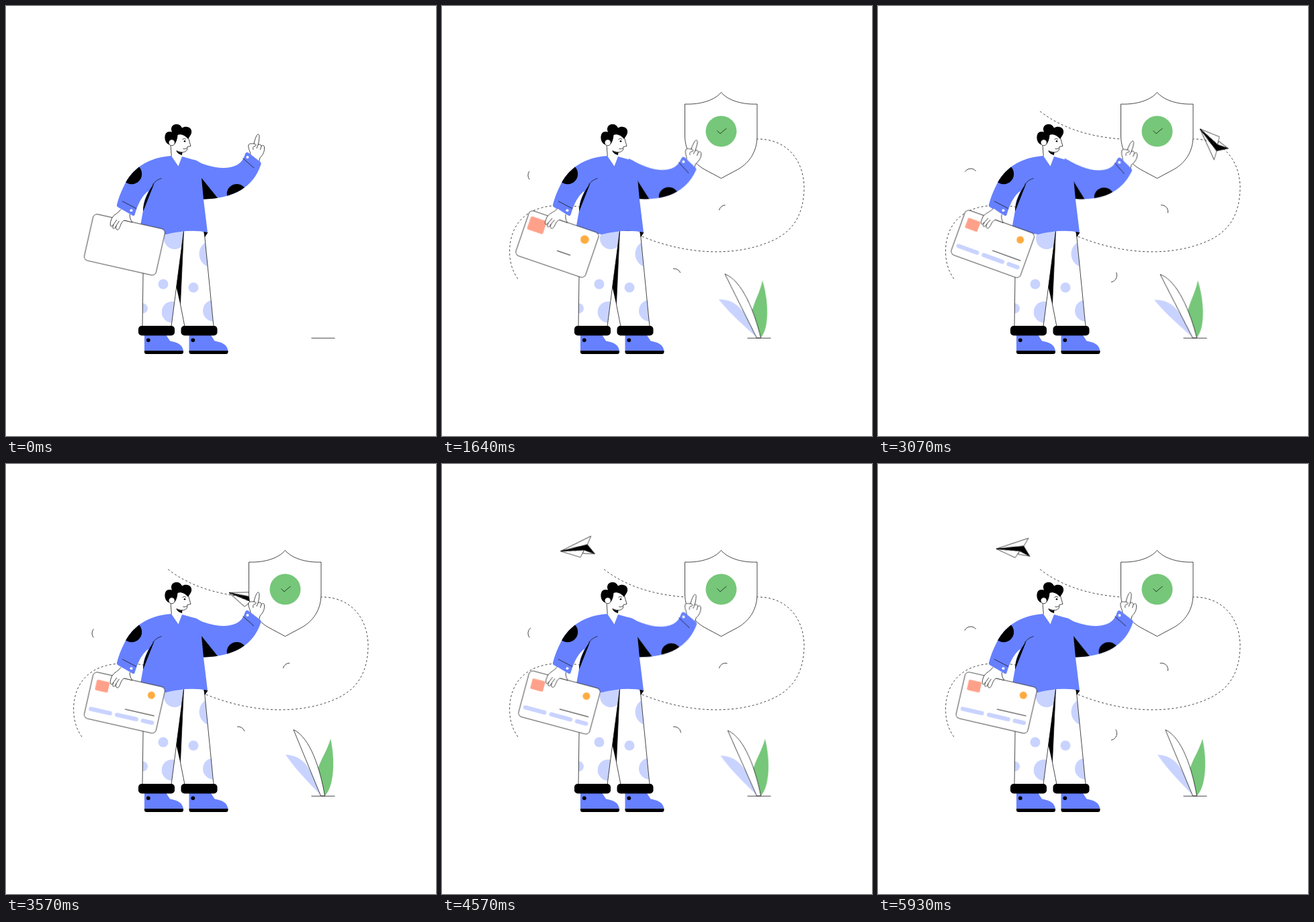
Recreate the animation shown at these times as an HTML page without scripts. Size 640 px wide and 640 px high, loop 6 s.

```html
<!DOCTYPE html>
<html lang="en">
<head>
<meta charset="utf-8">
<title>Secure payment</title>
<style>
html, body { margin: 0; width: 100%; height: 100%; overflow: hidden; background: #fff; }
svg { display: block; width: 100vw; height: 100vh; }
.ink { stroke: #1a1a1a; stroke-width: .8; stroke-linejoin: round; }
.line { fill: none; }
.white { fill: #fff; }
.blue { fill: #6680ff; }
.pale { fill: #c9d3ff; }
.green { fill: #76c779; }

/* swaying limbs and leaves */
.sway { animation: sway .6s cubic-bezier(.37,0,.63,1) infinite alternate; }
@keyframes sway { to { transform: rotate(var(--a)); } }
.arm { --a: 7.5deg; transform-origin: 298px 227px; }
.hold { --a: 7.4deg; transform-origin: 182.5px 308.8px; }
.leaves { --a: -4.9deg; transform-origin: 472px 494px; }

/* everything below shares one 6 s cycle */
.grow, .pop, .tick, .chip, .dot, .rule, .bar { animation: 6s linear infinite; }
.grow { animation-name: grow; transform-origin: 472px 494px; }
@keyframes grow { 0%, 3% { transform: scale(0); animation-timing-function: ease-out; } 10%, 100% { transform: none; } }
.pop { animation-name: pop; transform-origin: 415.5px 190px; }
@keyframes pop {
  0%, 4% { transform: scale(0); animation-timing-function: ease-out; }
  10% { transform: scale(1.06); animation-timing-function: ease-in-out; }
  16.5%, 100% { transform: none; }
}
.tick { animation-name: tick; transform-origin: 415.5px 186.5px; }
@keyframes tick { 0%, 10% { transform: scale(0); } 16.5%, 100% { transform: none; } }
.chip, .dot { transform-box: fill-box; transform-origin: center; }
.chip { animation-name: chip; }
@keyframes chip {
  0%, 21% { transform: scale(0); animation-timing-function: ease-out; }
  27% { transform: scale(1.28); animation-timing-function: ease-in-out; }
  32%, 100% { transform: none; }
}
.dot { animation-name: dot; }
@keyframes dot {
  0%, 21% { transform: scale(0); animation-timing-function: ease-out; }
  26% { transform: scale(1.2); animation-timing-function: ease-in-out; }
  30%, 100% { transform: none; }
}
.rule, .bar { transform-box: fill-box; transform-origin: left center; }
.rule { animation-name: rule; }
@keyframes rule { 0%, 25% { transform: scaleX(0); } 30%, 100% { transform: none; } }
.b1 { animation-name: bar1; }
.b2 { animation-name: bar2; }
.b3 { animation-name: bar3; }
@keyframes bar1 { 0%, 29% { transform: scaleX(0); } 34%, 100% { transform: none; } }
@keyframes bar2 { 0%, 32% { transform: scaleX(0); } 37%, 100% { transform: none; } }
@keyframes bar3 { 0%, 35% { transform: scaleX(0); } 39%, 100% { transform: none; } }

.arc { stroke-dasharray: 1 1; animation: arc 6s linear infinite; }
@keyframes arc { 0%, 8% { stroke-dashoffset: 1; } 100% { stroke-dashoffset: -10.5; } }
.dashes { stroke-dasharray: 3 3.2; }
.reveal { stroke-dasharray: 942; animation: reveal 6s linear infinite; }
@keyframes reveal { 0%, 12% { stroke-dashoffset: 942; } 32%, 100% { stroke-dashoffset: 0; } }

.fly {
  offset-path: path("M113 406C97 385 97 350 110 328C128 298 165 293 205 299C240 305 265 330 300 344C370 372 440 372 490 350C530 333 539 300 539 268C537 225 510 198 470 198C430 198 400 200 361 198C310 194 270 180 239 155C226 141 213 130 201 125");
  offset-rotate: 0deg;
  animation: fly 6s linear infinite, show 6s step-end infinite;
}
@keyframes fly {
  0%, 12% { offset-distance: 0%; }
  51.2% { offset-distance: 68.2%; }
  70%, 100% { offset-distance: 100%; }
}
@keyframes show { 0% { opacity: 0; } 10.3%, 100% { opacity: 1; } }
.turn { animation: turn 6s linear infinite; }
@keyframes turn {
  0%, 12% { transform: rotate(-95deg); }
  13.2% { transform: rotate(-83deg); }
  16% { transform: rotate(-60deg); }
  20% { transform: rotate(0deg); }
  27% { transform: rotate(25deg); }
  33% { transform: rotate(8deg); }
  40% { transform: rotate(-12deg); }
  45% { transform: rotate(-45deg); }
  48.3% { transform: rotate(-95deg); }
  51.2% { transform: rotate(-130deg); }
  57% { transform: rotate(-172deg); }
  62% { transform: rotate(-160deg); }
  68% { transform: rotate(-164deg); }
  71.7% { transform: rotate(-197deg); }
  77% { transform: rotate(-190deg); }
  84%, 100% { transform: rotate(-183deg); }
}
.flip { animation: flip 6s step-end infinite; }
@keyframes flip { 0% { transform: scaleY(-1); } 56.5%, 100% { transform: none; } }
</style>
</head>
<body>
<svg viewBox="0 0 640 640">
  <defs>
    <path id="trail" pathLength="942" d="M113 406C97 385 97 350 110 328C128 298 165 293 205 299C240 305 265 330 300 344C370 372 440 372 490 350C530 333 539 300 539 268C537 225 510 198 470 198C430 198 400 200 361 198C310 194 270 180 239 155"/>
    <path id="sleeve" d="M278 229C298 238 324 246 343 237C350 233 353 229 356 220Q358 216.500 361 218.500L378.500 232Q380.500 234 379 237C368 269 340 286 296 287.500L284 288Z"/>
    <path id="coat" d="M246 223C209 225.500 187 244 176 267C170 279 167 288 165 296Q164.500 298 166 299L188.500 312Q190.500 313 191.500 311C196 296 201 284 212 275L210.500 279C206 288 204 295 204 305L200 327V334L238 340C258 335 280 333 300 337L294 288L291 256L296 237C289 234 284 229 278 228.500L262 224L256.500 238.500Z"/>
    <path id="legL" d="M205 330H265L246 478H203Z"/>
    <path id="legR" d="M264.500 335L259.500 444L266 478H309L295 335Z"/>
    <clipPath id="inSleeve"><use href="#sleeve"/></clipPath>
    <clipPath id="inCoat"><use href="#coat"/></clipPath>
    <clipPath id="inL"><use href="#legL"/></clipPath>
    <clipPath id="inR"><use href="#legR"/></clipPath>
    <mask id="drawn" maskUnits="userSpaceOnUse" x="0" y="0" width="640" height="640">
      <use href="#trail" class="reveal" fill="none" stroke="#fff" stroke-width="6"/>
    </mask>
    <g id="shoe">
      <path class="blue" d="M206 490H238.500L244 498.500C256 501 263 504 264 514H206Z"/>
      <path d="M206 513H264V515Q264 518 261 518H209Q206 518 206 515Z"/>
      <circle cx="211.800" cy="497.300" r="2.900"/>
    </g>
  </defs>

  <!-- paper plane and its trail -->
  <g class="fly"><g class="turn"><g class="flip ink">
    <path class="white" d="M25 0L-23.700 13.400L-16 1.900Z"/>
    <path class="white" d="M25 0L-2.400-14.600L-9.700-4.900Z"/>
    <path class="white" d="M-9.700-4.900L-6.600-9.600L-24.200-13.500Z"/>
    <path d="M25 0L-16 1.900L-24.200-13.500L-9.700-4.900Z"/>
  </g></g></g>
  <g mask="url(#drawn)"><use href="#trail" class="ink line dashes"/></g>

  <g class="ink line">
    <path class="arc" pathLength="1" d="M130.300 258.400A10 10 0 0 1 145.700 245.600"/>
    <path class="arc" pathLength="1" d="M412.500 304A9.700 9.700 0 0 1 431.500 308"/>
    <path class="arc" pathLength="1" d="M344 391A10 10 0 0 1 347 411"/>
  </g>

  <g class="pop">
    <path class="ink white" d="M415.500 128.500C407 139 387 147 361.500 146V194C362 217 374 235 394 245L415.500 256.500L437 245C457 235 469 217 469 194V146C444 147 424 139 415.500 128.500Z"/>
    <circle class="green" cx="415.500" cy="186.500" r="23"/>
    <path class="ink line tick" d="M409.500 185.500L414 190L423.500 182"/>
  </g>

  <g class="grow"><g class="sway leaves">
    <path class="pale" d="M416 432.500C444 434 454 453 468.500 493C455 478 434 459 416 432.500Z"/>
    <path class="green" d="M483 409C479 425 468 440 464 455L474.500 494C489 480 490 438 483 409Z"/>
    <path class="ink white" d="M428 395.500L468.500 494H474.500C468 455 453 407 428 395.500Z"/>
  </g></g>
  <path class="ink" d="M454.500 494.300H489.500"/>

  <!-- legs -->
  <use href="#legL" class="white"/>
  <use href="#legR" class="white"/>
  <g class="pale" clip-path="url(#inL)">
    <circle cx="251" cy="346" r="16"/><circle cx="234" cy="414" r="7.500"/>
    <circle cx="203.500" cy="450" r="7.500"/><circle cx="247.500" cy="455.500" r="15.800"/>
  </g>
  <g class="pale" clip-path="url(#inR)">
    <circle cx="308" cy="369" r="20.500"/><circle cx="279" cy="419" r="7.500"/>
    <circle cx="309" cy="453.500" r="16"/>
  </g>
  <path d="M264.500 335L253.500 418L259.500 445Z"/>
  <path class="ink line" d="M204.200 390L203 477M264.500 335L246 477M264.500 335L259.500 444L266 477M295 335L309 477"/>
  <path d="M294 335L300.500 337L296 344Z"/>
  <use href="#shoe"/>
  <use href="#shoe" x="66.500"/>
  <rect x="197" y="476" width="54" height="14.500" rx="5"/>
  <rect x="260.500" y="476" width="54" height="14.500" rx="5"/>

  <!-- pointing arm -->
  <g class="sway arm">
    <path class="ink white" d="M364 222C364 216 360 213 361 207C362 204 366 205 369 205C370 200 372 194 374 191.500C376 190 377 192 377 194C377 199 376 203 375 207C377 205 380 206 380 209C382 206 385 208 384.500 211C385 217 382 222 378 226L376.500 233"/>
    <path class="ink line" d="M375 207L373 212M380 209L378.500 214M369 205C372 205.500 373 207 371 208.500C368 209 367 210 368 214"/>
    <use href="#sleeve" class="blue"/>
    <g clip-path="url(#inSleeve)">
      <circle cx="343.500" cy="279.800" r="14.800"/>
      <path d="M291 256L316 287V292H284V256Z"/>
    </g>
    <path class="ink line" d="M352.500 226.500L369 241"/>
    <circle class="white" cx="359.500" cy="225" r="2"/>
  </g>

  <!-- head -->
  <path class="white" d="M245 204L246 224L256.500 239L263 224L262 217L270 212L273 195L262 188Z"/>
  <path class="ink line" d="M245 206L246.300 223.500"/>
  <path d="M253 215C256 217 259 218 262.500 217.500L262 222C258 221 255 219 253 215Z"/>
  <path class="ink white" d="M270.500 193L272 198L275 208.500L270 209.500L269.700 213C268.500 218 262 219 254 215.500"/>
  <path class="ink line" d="M263.500 212.500Q267 213.500 269 211.500M262.500 198.500Q265 196.500 268 198.300"/>
  <circle cx="266" cy="201.300" r="1.300"/>
  <path d="M243 206.500C236 204 235 194 238 189.500C240 186.500 244 186.500 247 187.500C244 181 248 175.500 254 176C258 176 260.500 178 262 181.500C267 178 275 180 276 185.500C277 191 273 194 271 198C267 193 260 190 255.500 192C255 199 253 205 248 208Z"/>
  <circle class="white" cx="246.700" cy="203.300" r="4.500" stroke="#000" stroke-width=".6"/>

  <!-- jacket -->
  <use href="#coat" class="blue"/>
  <circle clip-path="url(#inCoat)" cx="187" cy="250" r="15.200"/>
  <path d="M221 263C211 277 204 291 204 306Z"/>
  <path class="ink line" d="M231.500 256.500C226 258 222 261 218 266M173 290.500L194 301.500"/>
  <circle class="white" cx="186.500" cy="304.300" r="2"/>

  <!-- card in hand -->
  <g class="sway hold">
    <g transform="translate(176.500 355.300) rotate(12.700)">
      <rect class="ink white" x="-54.800" y="-35.300" width="109.600" height="70.600" rx="6"/>
      <rect class="chip" x="-47.500" y="-24.800" width="19.500" height="16" rx="2" fill="#ffa18a"/>
      <circle class="dot" cx="36.500" cy="-19.700" r="5.500" fill="#ffab40"/>
      <rect class="rule" x="2.800" y="8.800" width="44.700" height=".9" fill="#1a1a1a"/>
      <rect class="pale bar b1" x="-50" y="17" width="35.500" height="6.200" rx="3"/>
      <rect class="pale bar b2" x="-10" y="17" width="35.500" height="6.200" rx="3"/>
      <rect class="pale bar b3" x="29.500" y="17" width="20" height="6.200" rx="3"/>
    </g>
    <path class="ink white" d="M171 302.500C168 308 161 310 158 315C155 321 154 328 157 328C158 328 159 327 160 325C158 330 159 332 161 331C162 331 163 329 164 327C163 332 164 333 166 333C168 333 169 330 171 325C172 322 174 320 176 319C180 320 185 321 188 322C185 318 184 314 184.300 310"/>
    <path class="ink line" d="M160 325L165 318M164 327L168.500 320"/>
  </g>
</svg>
</body>
</html>
```
